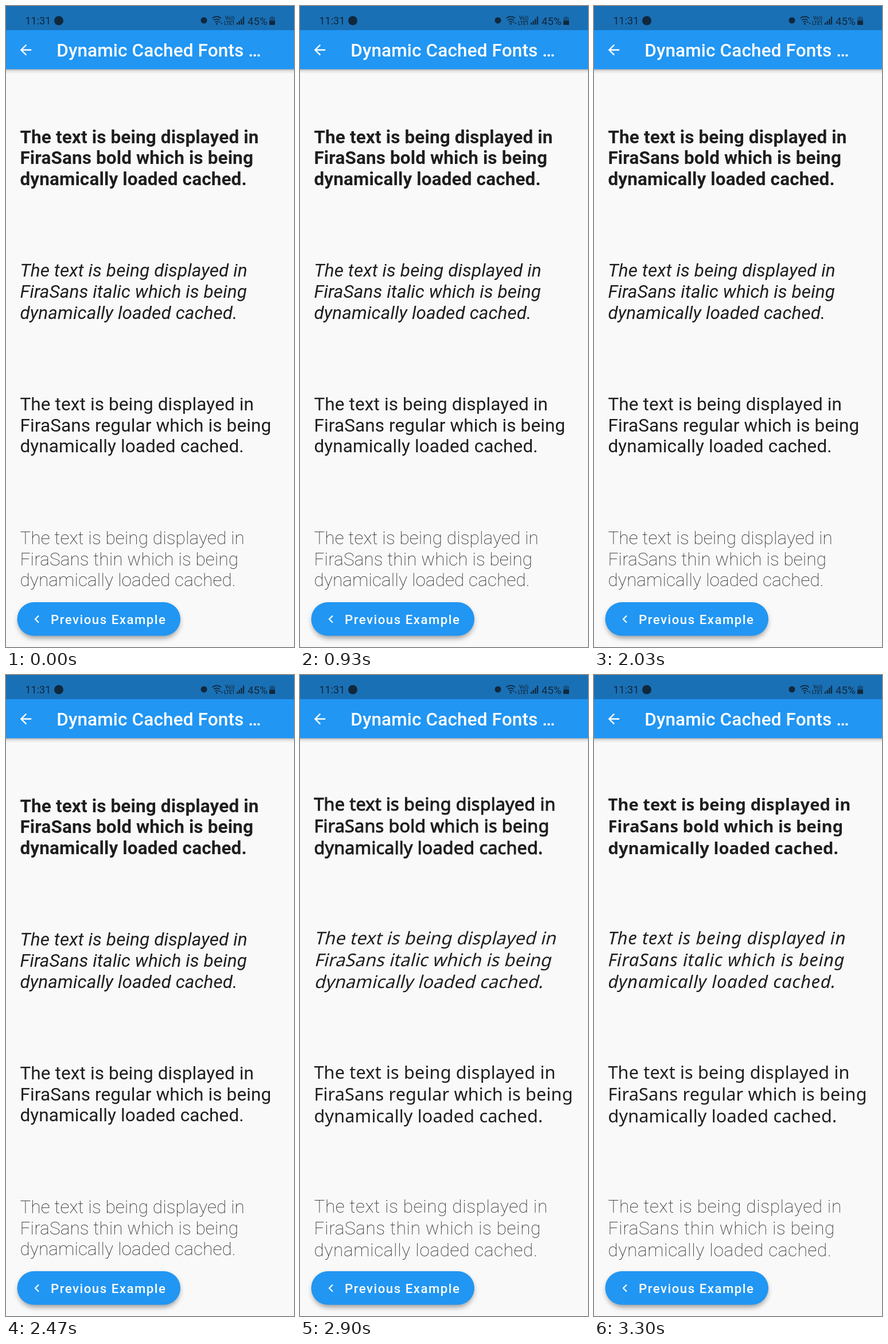
Write an HTML page that moves like this. It is 502 by 1116 pixels and loops after 3.33 s.

```html
<!DOCTYPE html>
<html lang="en">
<head>
<meta charset="utf-8">
<title>Dynamic Cached Fonts</title>
<style>
html, body { margin: 0; width: 100%; height: 100%; overflow: hidden; background: #f9f9f9; }
svg { display: block; width: 502px; height: 1116px; }
text { font-family: Roboto, sans-serif; white-space: pre; }
.body { fill: #1e1e1f; }
.fallback { font-size: 31.5px; letter-spacing: .12px; }
.loaded { font-family: "Noto Sans", sans-serif; font-size: 30.6px; letter-spacing: .18px; }
.loaded.bold { font-size: 29.2px; letter-spacing: 0; }
.loaded.italic { font-size: 31.2px; letter-spacing: .55px; }
.loaded.thin { font-family: Roboto, sans-serif; font-size: 31.5px; letter-spacing: .65px; }
.bold { font-weight: 700; }
.italic { font-style: italic; }
.thin { font-weight: 100; }
.fakebold { stroke: #1e1e1f; stroke-width: 1; }
.status { fill: #10283c; }
.line { fill: none; stroke: #10283c; stroke-width: 1.7; }
</style>
</head>
<body>
<svg viewBox="0 0 502 1116">
  <defs>
    <filter id="soft" x="-20%" y="-60%" width="140%" height="240%"><feGaussianBlur stdDeviation="4"/></filter>
    <linearGradient id="edge" x2="0" y2="1">
      <stop stop-color="#000" stop-opacity=".3"/>
      <stop offset=".4" stop-color="#000" stop-opacity=".09"/>
      <stop offset="1" stop-color="#000" stop-opacity="0"/>
    </linearGradient>
  </defs>
  <rect width="502" height="1116" fill="#f9f9f9"/>
  <g id="copy"></g>

  <rect y="110" width="502" height="8" fill="url(#edge)"/>
  <rect y="42" width="502" height="68" fill="#2196f3"/>
  <rect width="502" height="42" fill="#1a70b5"/>
  <g class="status">
    <text x="33.5" y="32" font-size="18">11:31</text>
    <circle cx="92" cy="25.5" r="8"/>
    <circle cx="345" cy="25" r="5.5"/>
    <path class="line" d="M359.5 21.5a11 11 0 0 1 15.5 0M362 25a7.5 7.5 0 0 1 10.5 0M364.5 28.2a4 4 0 0 1 5.5 0"/>
    <circle cx="367.2" cy="31" r="1.5"/>
    <path d="M371 29l1.7-2.4 1.7 2.4zM374.5 29.5h3.4l-1.7 2.6z"/>
    <text x="382" y="24" font-size="8.5" font-weight="500">Vo))</text>
    <text x="380" y="33" font-size="8.5" font-weight="500">LTE1</text>
    <path d="M402 29h2.3v3.5H402zM405.6 26h2.3v6.5h-2.3zM409.2 22.5h2.3v10h-2.3zM412.8 18.5h2.3v14h-2.3z"/>
    <text x="421" y="32.5" font-size="18.6">45%</text>
    <path fill-opacity=".4" d="M462 18h4v1.5h3V26h-10v-6.5h3z"/>
    <rect x="459" y="25.5" width="10" height="7.5" rx="1"/>
  </g>
  <path transform="translate(19.8 61.9) scale(1.22)" fill="#fff" d="M20 11H7.83l5.59-5.59L12 4l-8 8 8 8 1.41-1.41L7.83 13H20z"/>
  <text x="88.3" y="87.5" font-size="31.5" font-weight="500" letter-spacing=".12" fill="#fff">Dynamic Cached Fonts …</text>

  <rect x="21" y="1043" width="282" height="58" rx="29" fill-opacity=".36" filter="url(#soft)"/>
  <rect x="19.5" y="1038" width="284.5" height="58.5" rx="29.25" fill="#2196f3"/>
  <path d="M57 1061.5l-6 6 6 6" fill="none" stroke="#fff" stroke-width="2.2"/>
  <text x="78" y="1075.5" font-size="22.2" font-weight="500" letter-spacing="1.5" fill="#fff">Previous Example</text>
</svg>
<script>
const LOOP = 3330, SWAP = 2500, THIN = 2730, REST = 3070;
const LEFT = 24.4;
const copy = document.getElementById("copy");

// Builds one three-line paragraph; returns its group.
function paragraph(name, cls, y, pitch, skew = 0) {
  const lines = ["The text is being displayed in", `FiraSans ${name} which is being`, "dynamically loaded cached."];
  const group = document.createElementNS(copy.namespaceURI, "g");
  group.innerHTML = lines.map((line, i) =>
    `<text class="body ${cls}" transform="translate(${LEFT} ${y + i * pitch}) skewX(${skew})">${line}</text>`).join("");
  copy.append(group);
  return group;
}

const fallback = (name, y) => paragraph(name, `fallback ${name}`, y, 36.7);
const loaded = (name, cls, y, skew) => paragraph(name, `loaded ${cls}`, y, 37.9, skew);

// Each paragraph with the span of time it is visible.
const spans = [
  [fallback("bold", 238.5), 0, SWAP],
  [fallback("italic", 471.3), 0, SWAP],
  [fallback("regular", 704), 0, SWAP],
  [fallback("thin", 937), 0, SWAP],
  [loaded("bold", "fakebold", 235.7), SWAP, REST],
  [loaded("italic", "", 469, -14), SWAP, REST],
  [loaded("regular", "", 702.7), SWAP, LOOP],
  [loaded("thin", "", 936), SWAP, THIN],
  [loaded("thin", "thin", 936), THIN, LOOP],
  [loaded("bold", "bold", 235.7), REST, LOOP],
  [loaded("italic", "italic", 469), REST, LOOP],
];

function draw(t) {
  for (const [group, from, to] of spans)
    group.style.display = t >= from && t < to ? "" : "none";
}

const start = performance.now();
function tick() {
  draw((performance.now() - start) % LOOP);
  requestAnimationFrame(tick);
}
tick();
</script>
</body>
</html>
```
